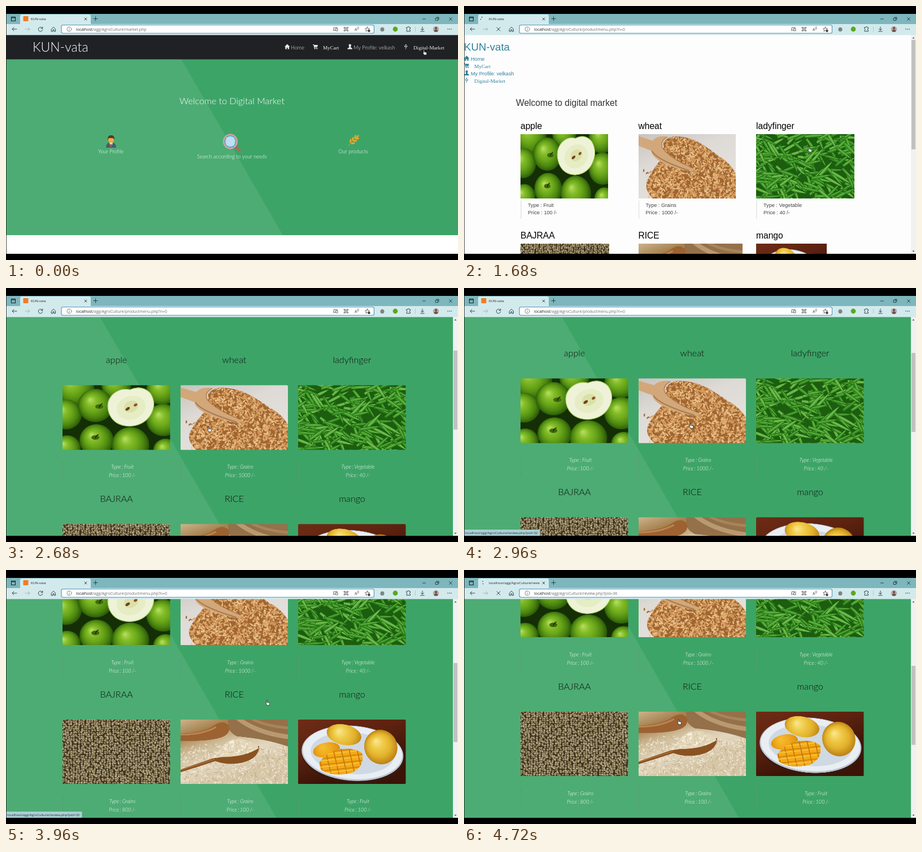
Write an HTML page with a canvas that moves like this. It is 800 px wide and 450 px high and loops after 4760 ms.

```html
<!DOCTYPE html>
<html lang="en">
<head>
<meta charset="utf-8">
<title>Digital market</title>
<style>
html, body { margin: 0; width: 100%; height: 100%; overflow: hidden; background: #000; }
canvas { display: block; width: 800px; height: 450px; }
</style>
</head>
<body>
<canvas id="stage" width="800" height="450"></canvas>
<script>
const LOOP = 4760;
const BRAND = 'KUN-vata', USER = 'velkash';
const SITE = '/agg/AgroCulture/';
const LATO = 'Lato, sans-serif', ARIAL = '"Liberation Sans", sans-serif';
const TIMES = '"Liberation Serif", serif', UI = '"Open Sans", sans-serif';
const stage = document.getElementById('stage').getContext('2d');
let c = stage;

// Drawing helpers
function text(s, x, y, font, color, align = 'left') {
  c.font = font;
  c.fillStyle = color;
  c.textAlign = align;
  c.fillText(s, x, y);
}
function rect(x, y, w, h, color, r = 0) {
  c.fillStyle = color;
  c.beginPath();
  c.roundRect(x, y, w, h, r);
  c.fill();
}
function oval(x, y, rx, ry, color, angle = 0) {
  c.fillStyle = color;
  c.beginPath();
  c.ellipse(x, y, rx, ry, angle, 0, 7);
  c.fill();
}
function shape(d, x, y, fill, stroke, width = 1, scale = 1) {
  const path = new Path2D(d);
  c.save();
  c.translate(x, y);
  c.scale(scale, scale);
  if (fill) { c.fillStyle = fill; c.fill(path); }
  if (stroke) { c.strokeStyle = stroke; c.lineWidth = width; c.lineCap = 'round'; c.stroke(path); }
  c.restore();
}
function blend(g, colors) {
  colors.forEach((color, i) => g.addColorStop(i / (colors.length - 1), color));
  return g;
}
// Fruit lit from the upper left
function ball(x, y, rx, ry, colors, angle = 0) {
  const g = c.createRadialGradient(x - rx * .3, y - ry * .35, 1, x, y, rx * 1.05);
  oval(x, y, rx, ry, blend(g, colors), angle);
}
function backdrop(...colors) {
  rect(0, 0, 190, 115, blend(c.createLinearGradient(0, 0, 40, 115), colors));
}
function random(seed) {
  return () => (seed = (seed * 16807) % 2147483647) / 2147483647;
}
function clipTo(d, draw) {
  c.save();
  c.clip(new Path2D(d));
  draw();
  c.restore();
}
// Scatters seeds in random shades
function scatter(count, seed, rx, ry, colors) {
  const rnd = random(seed);
  for (let i = 0; i < count; i++)
    oval(rnd() * 190, rnd() * 115, rx, ry, colors[i % colors.length], rnd() * 6.3);
}

// Product pictures, each in a 190 x 115 box
const pictures = {
  apple() {
    rect(0, 0, 190, 115, '#142f06');
    const apples = [[22, 4, 34], [95, 0, 26], [176, 8, 28], [6, 52, 28], [58, 36, 31],
                    [178, 62, 30], [8, 112, 24], [60, 98, 30], [120, 106, 33], [182, 116, 22]];
    for (const [x, y, r] of apples)
      ball(x, y, r, r * .95, ['#b4dc5c', '#84bd2a', '#6aa61a', '#4a8410', '#234d06']);
    for (const [x, y] of [[65, 38], [58, 93]]) {
      oval(x, y, 7, 4, '#3d6b0c');
      shape('M0 1Q2 -4 5 -5', x, y, null, '#2c2008', 1.6);
    }
    shape('M119 8Q140 -1 155 14Q168 34 154 55Q142 72 118 73Q92 72 83 52Q74 30 90 15Q104 4 119 8z',
      0, 0, '#eef3d8', '#a5c95a', 1.2);
    oval(121, 40, 26, 21, '#e6edc4', -.3);
    oval(121, 38, 13, 10, '#dbe0a8', -.4);
    oval(115, 42, 4.5, 2.4, '#72401b', -.6);
    oval(129, 35, 3.5, 2.4, '#8a5524', -.6);
  },
  wheat() {
    backdrop('#c8c3bf', '#dedad6', '#e4e0dc');
    const tones = ['#d9a468', '#c88d50', '#ecc592', '#9f6836', '#d79b5e', '#e2b27a'];
    clipTo('M0 115L5 60 60 50 190 75V115z', () => scatter(110, 17, 2.8, 1.2, tones));
    clipTo('M50 14Q62 2 82 5Q102 7 118 15T158 40Q180 52 190 70V115H28Q10 98 18 82T42 48z', () => {
      rect(0, 0, 190, 115, '#a0652f');
      scatter(2300, 11, 3, 1.25, tones);
    });
    shape('M0 4L28 12Q38 2 58 5Q44 12 47 25Q62 44 107 61Q111 67 96 66Q60 59 38 46Q26 38 25 30L0 21z',
      0, 0, '#d2a87a');
    shape('M27 31Q38 47 98 65', 0, 0, null, '#a87b4e', 2);
    shape('M56 6Q42 13 47 25Q62 44 106 61', 0, 0, null, '#a3703e', 1);
  },
  ladyfinger() {
    rect(0, 0, 190, 115, '#1c5d10');
    const rnd = random(29), shades = ['#348a1f', '#4aa32e', '#62b441', '#3f9827'];
    for (let i = 0; i < 230; i++) {
      const len = 26 + rnd() * 22;
      c.save();
      c.translate(rnd() * 210 - 25, rnd() * 125 - 5);
      c.rotate((rnd() - .4) * 2.2);
      shape(`M0 -2.6L3 -2.2Q${len / 2} -4 ${len} 0Q${len / 2} 3.5 3 2.2L0 2.6z`, 0, 0, shades[i % 4], '#1d6010', .6);
      shape(`M4 -.7L${len * .8} -.4`, 0, 0, null, '#86c866', .6);
      c.restore();
    }
  },
  bajra() {
    rect(0, 0, 190, 115, '#3b301d');
    const rnd = random(47), tones = ['#9a8b66', '#84754f', '#ad9f7b', '#92866a', '#756642'];
    for (let y = 0; y < 118; y += 3.7)
      for (let x = 0; x < 194; x += 4.6) {
        const px = x + rnd() * 3, py = y + rnd() * 2.4, a = rnd() * 3;
        oval(px, py, 2.6, 2, '#3b301d', a);
        oval(px, py, 2.3, 1.75, tones[Math.floor(rnd() * 5)], a);
        oval(px - .5, py - .5, .9, .7, '#c6b995', a);
      }
  },
  rice() {
    backdrop('#cdb58e', '#a5814f', '#d0bd9a', '#e2d7c0', '#d6c7a8');
    shape('M85 0H190V48Q150 34 100 30Q80 20 85 0z', 0, 0, '#94714a');
    shape('M102 -2Q135 24 192 31', 0, 0, null, '#b99a70', 8);
    shape('M125 -2Q150 12 192 15', 0, 0, null, '#a78558', 5);
    shape('M0 25Q35 24 56 13Q74 -1 85 10Q91 27 68 33Q48 39 0 38z', 0, 0, '#9c6232');
    shape('M0 27Q38 27 62 14', 0, 0, null, '#bd8450', 3);
    const grains = ['#eee5d2', '#d0bd99', '#e8dcc4', '#f4eddf', '#c4ae87'];
    clipTo('M0 52Q50 38 90 44T190 47V115H0z', () => scatter(1000, 83, 2.6, .7, grains));
    shape('M0 89L58 69Q100 64 139 47Q139 70 108 77Q82 82 62 74L0 94z', 0, 0, '#8a5220');
    shape('M0 90L60 71', 0, 0, null, '#b57a3e', 1.2);
    const heap = 'M56 66Q70 55 80 42Q98 29 116 37Q136 43 138 51Q110 70 56 66z';
    shape(heap, 0, 0, '#e3d6b8');
    clipTo(heap, () => scatter(1100, 61, 2.6, .7, ['#fbf6e8', '#d3c29c', '#f1e8d4']));
  },
  mango() {
    backdrop('#6f2c16', '#5d2310', '#3b1407');
    oval(97, 65, 90, 48, '#38190e', .08);
    oval(96, 60, 90, 49, '#bcc6d2', .08);
    oval(96, 59, 88, 47, '#e9eef3', .08);
    oval(96, 60, 74, 37, '#cfd9e4', .08);
    const skin = ['#fae58c', '#efcb48', '#e3b22c', '#bb8218'];
    ball(81, 27, 31, 18, skin, .22);
    ball(146, 49, 29, 31, skin, -.4);
    ball(50, 54, 24, 13, ['#f8bd32', '#f0a81c', '#dd8d0c'], -.2);
    const cut = 'M37 77Q48 60 72 53Q98 49 113 60Q118 84 94 95Q60 103 40 89z';
    shape(cut, 0, 0, '#f3aa16');
    clipTo(cut, () => {
      for (let i = 0; i < 7; i++) {
        shape('M0 0L14 60', 32 + i * 14, 45, null, '#c97808', 1.8);
        shape('M0 10L90 0', 30, 50 + i * 11, null, '#d1820b', 1.8);
        shape('M0 10L90 0', 30, 54 + i * 11, null, '#fcca4a', 1.4);
      }
    });
  }
};
function render(draw) {
  const canvas = document.createElement('canvas');
  canvas.width = 380;
  canvas.height = 230;
  c = canvas.getContext('2d');
  c.scale(2, 2);
  draw();
  c = stage;
  return canvas;
}
// name, picture, type, price, natural width
const products = [
  ['apple', 'apple', 'Fruit', 100, 155], ['wheat', 'wheat', 'Grains', 1000, 172],
  ['ladyfinger', 'ladyfinger', 'Vegetable', 40, 174], ['BAJRAA', 'bajra', 'Grains', 800, 157],
  ['RICE', 'rice', 'Grains', 100, 184], ['mango', 'mango', 'Fruit', 100, 125]
].map(([name, key, type, price, width]) =>
  ({ name, type: `Type : ${type}`, price: `Price : ${price} /-`, width, image: render(pictures[key]) }));

const icons = {
  home: 'M5 0L10 5H8.5V9.5H6V6.5H4V9.5H1.5V5H0z',
  cart: 'M0 .5H2L2.4 1.5H9.5L8.3 5.5H3.2L3.4 6.5H8.5V7.5H2.6L1.4 1.5H0zM3 8h1.6v1.6H3zM7 8h1.6v1.6H7z',
  user: 'M5 0C7 0 7.4 1.5 7.2 3S6.3 5 6.2 5.6 9.6 7 9.6 9.5H.4C.4 7 3.8 6.5 3.8 5.6S3 4.5 2.8 3 3 0 5 0z',
  grain: 'M5 0C6.5 1.5 6.3 2.5 5 3.5 3.7 2.5 3.5 1.5 5 0zM4.7 6C2.5 5.5 2 4.5 2 3 4 3.5 4.7 4.5 4.7 6z' +
    'M5.3 6C7.5 5.5 8 4.5 8 3 6 3.5 5.3 4.5 5.3 6zM4.6 9.5V6h.8v3.5z'
};
// icon, label, icon x, label x, font
const menu = [
  ['home', 'Home', 493, 504, LATO], ['cart', 'MyCart', 543, 561, TIMES],
  ['user', 'My Profile: ' + USER, 604, 615, LATO], ['grain', 'Digital-Market', 703, 721, TIMES]
];

// Pages
function header(dx) {
  rect(0, 51, 800, 43.5, '#1f2124');
  text(BRAND, 47, 81, `300 23px ${LATO}`, '#fff');
  for (const [icon, label, ix, lx, font] of menu) {
    shape(icons[icon], ix + dx, 67.5, '#e3efe3', null, 0, .95);
    text(label, lx + dx, 76.5, `${font === LATO ? 300 : 400} 9.15px ${font}`, '#e8f2e8');
  }
}
function greenArea(edge, height) {
  rect(0, 94, 800, height, '#3da467');
  shape(`M0 0H${edge}L${edge + height * .577} ${height}H0z`, 0, 94, '#4dac73');
}
function marketPage() {
  rect(0, 51, 800, 388, '#fff');
  greenArea(310, 312);
  header(0);
  text('Welcome to Digital Market', 400, 174, `300 16.1px ${LATO}`, '#fff', 'center');
  const labels = [['Your Profile', 185.5, 261], ['Search according to your needs', 400, 269.5], ['Our products', 614.5, 261]];
  for (const [s, x, y] of labels) text(s, x, y, `300 9.15px ${LATO}`, '#fff', 'center');
  // Profile figure
  shape('M-9 11Q-9 3 -3 2H3Q9 3 9 11z', 186, 240, '#44606b');
  shape('M-3 2L0 10 3 2z', 186, 240, '#eee');
  shape('M-.8 4H.8L1.2 9 0 10.5-1.2 9z', 186, 240, '#c8452f');
  oval(186, 236, 5.4, 6.5, '#f2a93b');
  shape('M-6 -2Q-7 -11 0 -11T6 -2Q5 -6 2 -6T-4 -6z', 186, 240, '#4a3a33');
  // Magnifier
  shape('M406 249L413.5 256.5', 0, 0, null, '#a76a5b', 4.5);
  oval(397, 240, 13, 13.5, '#d3a79d');
  oval(397, 240, 10.5, 11, '#5d9ccb');
  oval(397, 240, 9, 9.5, '#a9d6ee');
  for (let i = -2; i < 3; i++)
    shape(`M${397 + i * 3} 233V247M391 ${240 + i * 3}H403`, 0, 0, null, '#e0f2fa', .6);
  // Wheat ear
  shape('M605.5 247.5L622 231.5', 0, 0, null, '#f0a021', .9);
  for (let i = 0; i < 3; i++) {
    oval(609.8 + i * 4.2, 239 - i * 3.6, 1.5, 3.5, '#f5a623', .15);
    oval(614.2 + i * 3.6, 243.3 - i * 4.2, 3.5, 1.5, '#f5a623', -.15);
  }
  oval(622.5, 231, 1.4, 3, '#f5a623', .75);
}
function plainPage() {
  const blue = '#2f829f';
  rect(0, 51, 800, 388, '#fdfdfd');
  text(BRAND, 0, 79, `18.7px ${ARIAL}`, blue);
  menu.forEach(([icon, label, , , font], i) => {
    const serif = font === TIMES;
    shape(icons[icon], 0, 88 + i * 13, blue, null, 0, .95);
    text(label, serif ? 18.3 : 12, 97 + i * 13, `9.15px ${serif ? TIMES : ARIAL}`, blue);
  });
  text('Welcome to digital market', 92, 177, `15.6px ${ARIAL}`, '#333');
  products.forEach((p, i) => {
    const x = 100 + i % 3 * 208.5, y = i > 2 ? 194 : 0;
    text(p.name, x, 218 + y, `15.6px ${ARIAL}`, '#000');
    c.drawImage(p.image, x, 226.5 + y, p.width, 114.5);
    rect(x, 345 + y, 2, 32, '#eaeaea');
    text(p.type, x + 13, 356 + y, `9.15px ${ARIAL}`, '#444');
    text(p.price, x + 13, 369 + y, `9.15px ${ARIAL}`, '#444');
  });
}
function productPage(scroll) {
  c.save();
  c.translate(0, -scroll);
  greenArea(108, 800);
  header(-9);
  text('Welcome to digital market', 395.5, 174, `300 16.1px ${LATO}`, '#fff', 'center');
  products.forEach((p, i) => {
    const x = 100 + i % 3 * 208.5, y = i > 2 ? 246 : 0;
    text(p.name, x + 95.5, 276.5 + y, `300 16.1px ${LATO}`, '#0b130e', 'center');
    c.save();
    c.beginPath();
    c.roundRect(x, 315.7 + y, 190.5, 114.5, 2);
    c.clip();
    c.drawImage(p.image, x, 315.7 + y, 190.5, 114.5);
    c.restore();
    rect(x + .6, 450 + y, .8, 38, '#5f9a76');
    c.wordSpacing = '-0.6px';
    for (const [s, line] of [[p.type, 463.5], [p.price, 478.5]])
      text(s, x + 106, line + y, `italic 300 9.15px ${LATO}`, '#fff', 'center');
    c.wordSpacing = '0px';
  });
  c.restore();
}
function scrollbar(top, length) {
  rect(791, 51, 9, 388, '#f1f1f1');
  rect(792, top, 7, length, '#c1c1c1');
  shape('M793.5 57.5L795.5 55 797.5 57.5z', 0, 0, '#555');
  shape('M793.5 433.5L795.5 436 797.5 433.5z', 0, 0, '#555');
}

// Browser window
function chrome(t, loading, path, tab) {
  const ink = '#20383b', line = (d, x, y, color = ink, w = .9) => shape(d, x, y, null, color, w);
  rect(0, 14, 800, 19, '#7db6bc');
  rect(0, 32, 800, 19.5, '#d3eaed');
  rect(25, 15, 125, 20, '#d3eaed', 3);
  line('M-3.5 -3.5H3.5V3.5H-3.5zM-3.5 -2H3.5', 13, 23, '#14282a', 1.1);
  if (loading) {
    for (const k of [0, 1.9]) {
      const a = t / 110 + k;
      oval(32 + 2.6 * Math.cos(a), 22.5 + 2.6 * Math.sin(a), .8, .8, '#222');
    }
  } else rect(30.5, 18, 9, 9, '#f07d25', 1);
  c.save();
  c.beginPath();
  c.rect(44, 15, 90, 16);
  c.clip();
  text(tab, 44, 25, `6.1px ${UI}`, '#222');
  c.restore();
  line('M-2 -2L2 2M2 -2L-2 2', 141, 23);
  line('M-3.5 0H3.5M0 -3.5V3.5', 158.5, 22.5);
  line('M-2.5 0H2.5', 740, 23);
  line('M-2.5 -1H1.5V3H-2.5zM-1 -2.5H3V1.5', 763, 22.5);
  line('M-2.5 -2.5L2.5 2.5M2.5 -2.5L-2.5 2.5', 787, 23);

  line('M4 0H-4L-1 -3M-4 0L-1 3', 15, 41);
  line('M-4 0H4L1 -3M4 0L1 3', 38, 41, '#98b0b3');
  if (loading) line('M-3 -3L3 3M3 -3L-3 3', 61, 41);
  else line('M3.4 -1.6A3.8 3.8 0 1 0 3.8 1M3.8 -4V-1.2H1', 61, 41);
  line('M-3.5 0L0 -3.8 3.5 0V4H1V1H-1V4H-3.5z', 84, 41);

  rect(97.5, 33.2, 554.5, 15.6, '#4c91bd', 3);
  rect(98.6, 34.3, 552.3, 13.4, '#fff', 2);
  line('M4 0A4 4 0 1 1 -4 0A4 4 0 1 1 4 0M0 -.5V2M0 -2V-1.9', 112, 41, '#555', .7);
  text('localhost', 124, 43.7, `6.95px ${UI}`, '#222');
  text(path, 124 + c.measureText('localhost').width, 43.7, `6.95px ${UI}`, '#6c6c6c');
  line('M-3.5 2H0M-3 2V-2.5H3.5M1 -1H4V3H1z', 583, 41, '#444', .8);
  line('M-3.5 -3.5h2v2h-2zM1.5 -3.5h2v2h-2zM-3.5 1.5h2v2h-2zM1.5 1.5h2v2h-2zM-1.5 -1.5h3v3h-3z', 602, 41, '#444', .7);
  text('A', 617, 44, `7px ${UI}`, '#444');
  line('M0 -2Q1.3 0 0 1.5M1.5 -3Q3.4 0 1.5 2', 622, 39.5, '#444', .6);
  line('M0 -4L1.2 -1.2 4 -1 2 1 2.5 4 0 2.3-2.5 4-2 1-4 -1-1.2 -1.2z', 639.5, 41, '#444', .8);
  oval(642.5, 44, 2.2, 2.2, '#444');

  oval(666, 41.5, 3.5, 3.8, '#7c8585');
  oval(689, 41, 4.4, 4.4, '#5aa91d');
  line('M-3 -3H-1A1.4 1.4 0 0 1 1.8 -3H3.5V-.8A1.4 1.4 0 0 0 3.5 2V3.8H-3V1.8A1.5 1.5 0 0 0 -3 -1z', 712, 41);
  line('M0 -4V4', 724.5, 41, '#a5bfc2', .8);
  line('M0 -4V2L-2.5 -.4M0 2L2.5 -.4M-3.3 4H3.3', 737, 41);
  oval(761, 41, 5.3, 5.3, '#b9a9a5');
  oval(761, 39.3, 2, 2.2, '#6d4f4a');
  shape('M-3.6 3.8Q-3 .8 0 .8T3.6 3.8Q0 6.2 -3.6 3.8z', 761, 41, '#6d4f4a');
  for (const x of [782, 785, 788]) oval(x, 41, .8, .8, ink);
}
function status(path) {
  rect(0, 428, 134.5, 11, '#a9cfd3', 1);
  text('localhost' + SITE + path, 2, 435.8, `6.05px ${UI}`, '#26383a');
}

// Pointer: time, x, y
const track = [[0, 740, 77], [600, 640, 276], [1080, 611, 249], [1720, 611, 249], [2400, 565, 254],
  [2680, 359, 245], [3320, 462, 230], [4040, 462, 230], [4480, 380, 264], [LOOP, 380, 264]];
function pointer(t) {
  const i = track.findIndex(k => k[0] > t), [t0, x0, y0] = track[i - 1], [t1, x1, y1] = track[i];
  const u = (t - t0) / (t1 - t0), e = u * u * (3 - 2 * u);
  const x = x0 + (x1 - x0) * e, y = y0 + (y1 - y0) * e;
  const arrow = (t >= 80 && t < 1000) || (t >= 1760 && t < 2560);
  if (arrow) shape('M0 0V8L1.9 6.3 3.1 9 4.3 8.5 3.1 5.9H5.6z', x, y, '#fff', '#111', .7);
  else shape('M1.5 0C2.4 0 2.5 .6 2.5 1.2V3.6L6 4.4C6.7 4.6 6.8 5 6.7 5.8L6 9H2.2L0 5.6C-.2 5 .5 4.7 1 5V1C1 .4 1 0 1.5 0z',
    x - 2, y + .8, '#fff', '#111', .7);
}

// Each wheel turn glides the page by the same distance
const STEP = 155.5, GLIDE = 420;
function glide(t, start) {
  const u = Math.min(1, Math.max(0, (t - start) / GLIDE));
  return STEP * (1 - (1 - u) ** 3);
}

function draw(t) {
  rect(0, 0, 800, 450, '#000');
  const scroll = glide(t, 2440) + glide(t, 3730);
  c.save();
  c.beginPath();
  c.rect(0, 51, 800, 388);
  c.clip();
  if (t < 1600) marketPage();
  else if (t < 1760) { plainPage(); scrollbar(60, 194); }
  else { productPage(scroll); scrollbar(60 + scroll * .353, 140); }
  if (t >= 1160 && t < 1400) status('productmenu.php?n=0');
  if (t >= 2840 && t < 4600) status('review.php?pid=' + (t < 4240 ? 32 : 36));
  c.restore();

  const leaving = t >= 4600, loading = leaving || (t >= 1400 && t < 1800);
  const path = SITE + (t < 1400 ? 'market.php' : leaving ? 'review.php?pid=36' : 'productmenu.php?n=0');
  chrome(t, loading, path, leaving ? 'localhost' + path : BRAND);
  rect(0, 14, .8, 425, '#16201f');
  pointer(t);
}

const begin = performance.now();
function tick() {
  draw((performance.now() - begin) % LOOP);
  requestAnimationFrame(tick);
}
tick();
</script>
</body>
</html>
```
